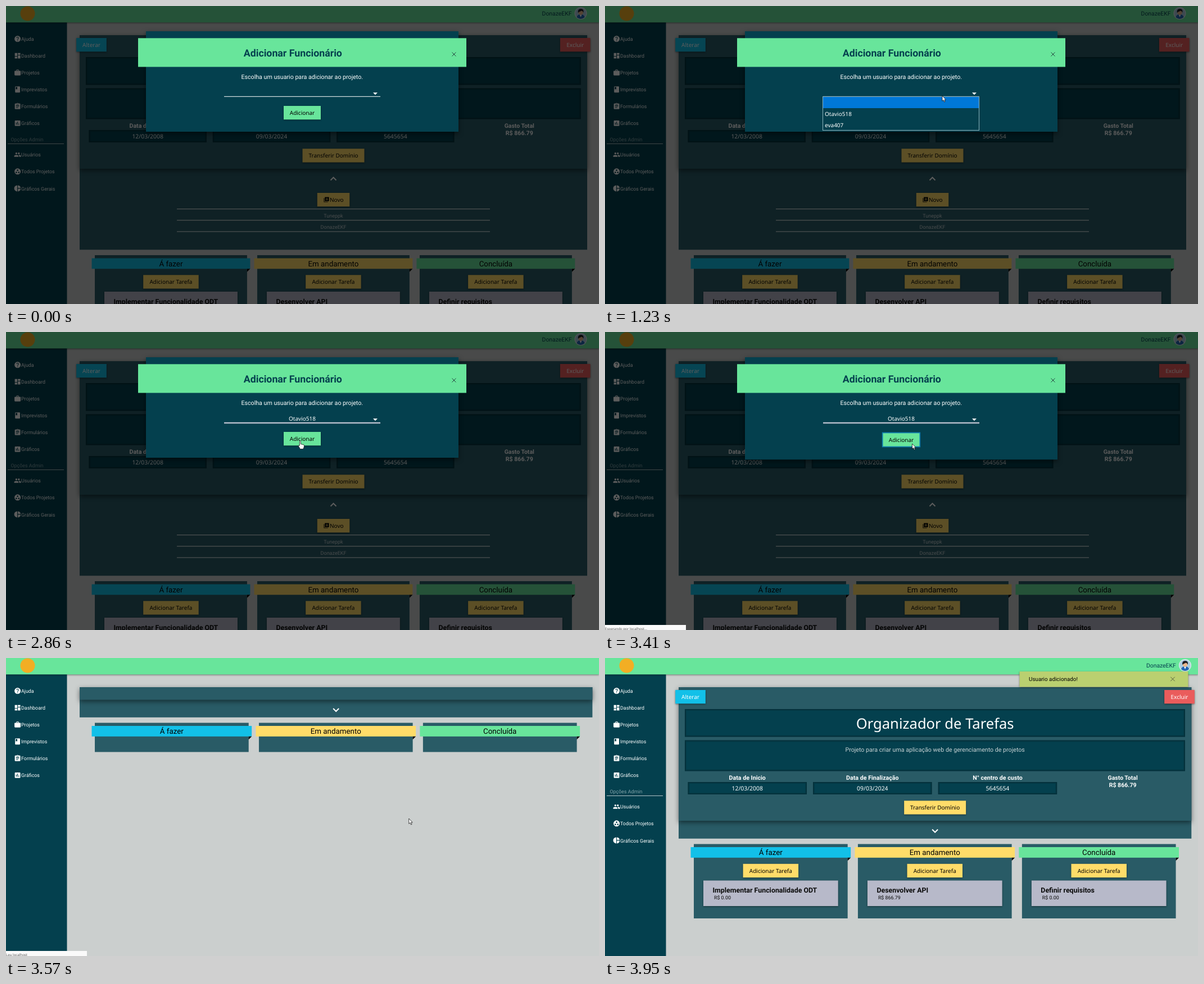
Write an HTML page that moves like this. It is 1055x531 px and loops after 4350 ms.

```html
<!DOCTYPE html>
<html lang="pt-BR">
<head>
<meta charset="utf-8">
<title>Adicionar funcionário</title>
<style>
html, body { margin: 0; width: 100%; height: 100%; overflow: hidden; background: #cbcfce; }
svg { display: block; width: 1055px; height: 531px; }
text { font-family: Roboto, sans-serif; text-rendering: geometricPrecision; white-space: pre; }
.n { font-family: "Noto Sans", sans-serif; }
.b { font-weight: 700; }
.m { text-anchor: middle; }
.e { text-anchor: end; }
.s { filter: drop-shadow(0 1px 1.5px rgba(0,0,0,.45)); }
.d { filter: drop-shadow(0 3px 4px rgba(0,0,0,.5)); }
</style>
</head>
<body>
<svg id="stage" viewBox="0 0 1055 531" xmlns="http://www.w3.org/2000/svg"></svg>
<script>
const LOOP = 4350, FIRST_STEP = 207, STEP = 77.8;
const GREEN = '#68e59b', DEEP = '#04404e', PANEL = '#295b66', YELLOW = '#ffdc69',
      BLUE = '#12c0e8', RED = '#ea5c5c', LILAC = '#b7b9c9', WHITE = '#fff', BLACK = '#000';
const USER = 'DonazeEKF', MEMBER = 'Tuneppk', PICKED = 'Otavio518', OTHER = 'eva407';

const rect = (x, y, w, h, fill, more = '') =>
  `<rect x="${x}" y="${y}" width="${w}" height="${h}" fill="${fill}" ${more}/>`;
// y is the middle of the capitals
const text = (x, y, size, str, cls = '', fill = WHITE) =>
  `<text x="${x}" y="${y + size * .36}" font-size="${size}" class="${cls}" fill="${fill}">${str}</text>`;
const line = (d, stroke, width) =>
  `<path d="${d}" fill="none" stroke="${stroke}" stroke-width="${width}"/>`;
const group = (id, body, more = '') => `<g id="${id}" ${more}>${body}</g>`;
const button = (cx, y, w, fill, label, ink = BLACK) =>
  rect(cx - w / 2, y, w, 24.3, fill, 'class="s"') + text(cx, y + 12.4, 10, label, 'n m', ink);
const cross = (x, y, r, color) =>
  line(`M${x - r} ${y - r}l${2 * r} ${2 * r}m0 ${-2 * r}l${-2 * r} ${2 * r}`, color, 1);
const field = (x, y, w, h) => rect(x, y, w, h, DEEP) +
  [1, 2, 3].map(i => rect(x + i / 2, y + i / 2, w - i, h - i, 'none',
    `stroke="#000" stroke-opacity=".1" stroke-width="${i}"`)).join('');

// Icons on a 24 unit grid, holes by the even-odd rule
const disc = (x, y, r) => `M${x - r} ${y}a${r} ${r} 0 1 0 ${2 * r} 0a${r} ${r} 0 1 0 ${-2 * r} 0z`;
const box = (x, y, w, h) => `M${x} ${y}h${w}v${h}h${-w}z`;
const icon = (x, y, scale, d, fill) =>
  `<path transform="translate(${x} ${y}) scale(${scale})" d="${d}" fill="${fill}" fill-rule="evenodd"/>`;
const ICONS = {
  help: disc(12, 12, 10) + box(11, 17, 2, 2) +
    'M8 9a4 4 0 0 1 8 0c0 2.6-3 3-3 6h-2c0-3.6 3-4 3-6a2 2 0 0 0-4 0z',
  tiles: box(3, 3, 8, 10) + box(3, 15, 8, 6) + box(13, 11, 8, 10) + box(13, 3, 8, 6),
  bag: 'M2 8q0-2 2-2h4V4q0-2 2-2h4q2 0 2 2v2h4q2 0 2 2v11q0 2-2 2H4q-2 0-2-2z' + box(10, 4, 4, 2),
  book: 'M4 4q0-2 2-2h12q2 0 2 2v16q0 2-2 2H6q-2 0-2-2zM6 4v8l2.5-1.5L11 12V4z',
  form: 'M3 5q0-2 2-2h4q3-4 6 0h4q2 0 2 2v14q0 2-2 2H5q-2 0-2-2z' +
    disc(12, 4, 1) + box(7, 7, 10, 2) + box(7, 11, 10, 2) + box(7, 15, 7, 2),
  bars: 'M3 5q0-2 2-2h14q2 0 2 2v14q0 2-2 2H5q-2 0-2-2z' +
    box(7, 10, 2, 7) + box(11, 7, 2, 10) + box(15, 13, 2, 4),
  people: disc(8, 8, 3) + disc(16, 8, 3) +
    'M1 19v-2.5c0-4.6 14-4.6 14 0V19zM17 19v-2.5q0-2-2-3.45c3-.3 8 .8 8 3.45V19z',
  team: disc(12, 12, 10) + disc(8, 15, 2.5) + disc(12, 8, 2.5) + disc(16, 15, 2.5),
  pie: 'M11 2v20a10 10 0 0 1 0-20zM13 2v9h9a10 10 0 0 0-9-9zM13 13v9a10 10 0 0 0 9-9z',
  add: 'M4 6H2v16h16v-2H4zM6 2h16v16H6z' + 'M13 5h2v4h4v2h-4v4h-2v-4h-4V9h4z'
};

const MENU = [['Ajuda', 'help'], ['Dashboard', 'tiles'], ['Projetos', 'bag'],
  ['Imprevistos', 'book'], ['Formulários', 'form'], ['Gráficos', 'bars']];
const ADMIN = [['Usuários', 'people'], ['Todos Projetos', 'team'], ['Gráficos Gerais', 'pie']];
const menu = (items, y0) => items.map(([label, name], i) => {
  const y = y0 + i * 30.05;
  return icon(14, y - 7, .55, ICONS[name], WHITE) + text(27, y, 8.9, label);
}).join('');

const COLUMNS = [
  ['Á fazer', BLUE, 'Implementar Funcionalidade ODT', 'R$ 0.00'],
  ['Em andamento', YELLOW, 'Desenvolver API', 'R$ 866.79'],
  ['Concluída', GREEN, 'Definir requisitos', 'R$ 0.00']
];
const DATES = [['Data de Inicio', '12/03/2008'], ['Data de Finalização', '09/03/2024'],
  ['N° centro de custo', '5645654']];

const column = ([name, color, task, cost], x, y, w, full) => {
  const cx = x + w / 2;
  let out = rect(x, y, w, full ? 132.5 : 52, PANEL) +
    rect(x - 5.5, y + 5.5, w + 11, 18.8, color) +
    `<path d="M${x + w} ${y + 24.3}h5.5l-5.5 5.5z"/>` +
    text(cx, y + 15, 13.35, name, 'm', BLACK);
  if (full) out += button(cx, y + 35.3, 98.5, YELLOW, 'Adicionar Tarefa') +
    rect(x + 17, y + 65, w - 34, 45.5, LILAC, 'class="s"') +
    text(x + 33.5, y + 82.3, 12.4, task, 'b', '#0a0a0a') +
    text(x + 36, y + 95.7, 8.85, cost, '', '#0a0a0a');
  return out;
};

const avatar = x => `<g transform="translate(${x} 13)"><circle r="11" fill="#dfe9ee"/>
  <circle r="9.8" fill="#a9cbe0"/><path d="M-7 7q1-5 7-5t7 5a9.8 9.8 0 0 1-14 0z" fill="#2166b5"/>
  <path d="M-2 2.5h4L0 7z" fill="#fff"/><circle cy="-1.5" r="4.3" fill="#eab78c"/>
  <path d="M-4.8-1q-1-7 5-7t4.6 7q-1-3-3-3.500-4 1-6.6 3.500z" fill="#1c1d24"/></g>`;

const details = (right, W, mid) =>
  button(152, 57, 53.7, BLUE, 'Alterar', WHITE) +
  button(right - 21.3, 57, 53.7, RED, 'Excluir', WHITE) +
  field(142, 91, right - 153.3, 49.5) + field(142, 146.5, right - 153.3, 55) +
  text(mid, 117, 25.6, 'Organizador de Tarefas', 'n m') +
  text(mid, 163, 10.67, 'Projeto para criar uma aplicação web de gerenciamento de projetos', 'm', '#c9d3d5') +
  DATES.map(([label, value], i) => {
    const x = 147.5 + i * W * .244, w = W * .2318;
    return text(x + w / 2, 213, 10.67, label, 'b m') + field(x, 221, w, 22) +
      text(x + w / 2, 232.3, 10.45, value, 'n m');
  }).join('') +
  text(147.5 + W * .848, 213, 10.5, 'Gasto Total', 'b m') +
  text(147.5 + W * .848, 226.5, 10.6, 'R$ 866.79', 'b m') +
  button(mid, 254.3, 110, YELLOW, 'Transferir Domínio');

const members = mid => button(mid, 333, 57.5, YELLOW, '') +
  icon(mid - 18, 339.5, .46, ICONS.add, BLACK) + text(mid - 6.5, 345.4, 10, 'Novo', 'n', BLACK) +
  [361.7, 381.8, 402].map(y => rect(mid - 278.5, y - .5, 557, 1, WHITE)).join('') +
  text(mid, 373.3, 9, MEMBER, 'm', '#c9d3d5') + text(mid, 393.5, 9, USER, 'm', '#c9d3d5');

function page(right, columnsTop, { full = true, open = false, face = '' } = {}) {
  const W = right - 131, mid = (131 + right) / 2, headEnd = full ? 290 : 74.5, flip = open ? -1 : 1;
  return rect(0, 0, 1055, 531, '#cbcfce') +
    rect(131, 52, W, columnsTop - 61.7, PANEL) +
    rect(131, 52, W, headEnd - 52, PANEL, 'class="d"') +
    (full ? details(right, W, mid) : '') +
    line(`M${mid - 5} ${headEnd + 18 - 2.5 * flip}l5 ${5 * flip}l5 ${-5 * flip}`, WHITE, 2) +
    (open ? members(mid) : '') +
    COLUMNS.map((c, i) => column(c, 158 + i * W * .32, columnsTop, W * .3, full)).join('') +
    rect(0, 29, 108.5, 502, DEEP) + menu(MENU, 59) +
    (full ? text(8.5, 237.5, 8.9, 'Opções Admin', '', '#84a1a8') +
      rect(3, 245, 100, 1, '#b5c3c6') + menu(ADMIN, 265.2) : '') +
    rect(0, 0, 1055, 29.3, GREEN, 'class="s"') +
    '<circle cx="38.5" cy="13.5" r="13" fill="#f2ae24"/>' +
    (full ? text(right - 27.5, 13.7, 10.4, USER, 'e', DEEP) + face : '');
}

const modal = rect(249, 45, 556, 179, DEEP, 'id="sheet" class="d"') +
  rect(235, 57.3, 584, 51.2, GREEN) +
  text(510.3, 84, 17.75, 'Adicionar Funcionário', 'b m', DEEP) + cross(797, 86, 3.5, '#24433f') +
  text(526.8, 125.7, 10.67, 'Escolha um usuario para adicionar ao projeto.', 'm') +
  '<path d="M653 154.2h8l-4 4z" fill="#fff"/>' +
  rect(388, 160.8, 278, 1, WHITE, 'id="underline"') +
  group('choice', text(527, 154.6, 10, PICKED, 'n m')) +
  group('idle', button(527, 178, 66, GREEN, 'Adicionar')) +
  group('focused', rect(493.7, 179.5, 66.6, 25, GREEN, 'stroke="#0f7fb0" stroke-width="1.7"') +
    text(527, 192.2, 10, 'Adicionar', 'n m', BLACK)) +
  group('list', rect(387.5, 161.5, 278, 60, DEEP, 'stroke="#8fb4bd"') +
    rect(388, 162, 277, 20, '#0078d7', 'id="mark"') +
    text(391, 192, 10, PICKED, 'n') + text(391, 212.2, 10, OTHER, 'n'));

const $ = id => document.getElementById(id);
$('stage').innerHTML =
  group('before', page(1034, 444, { open: true, face: avatar(1022.5) }) +
    rect(0, 0, 1055, 531, BLACK, 'opacity=".64"') + modal) +
  group('loading', page(1043.3, 115.5, { full: false })) +
  group('after', page(1043.3, 331.5, { face: group('face', avatar(1032)) })) +
  group('toast', rect(737.5, 24, 300, 27.5, '#bad070', 'class="s"') +
    text(754, 37.8, 9.85, 'Usuario adicionado!', '', BLACK) + cross(1010, 37.5, 3.7, '#566040')) +
  group('status', rect(0, 522, 144, 9, '#fafafa') +
    '<text id="message" x="0" y="530.5" font-size="6.15" class="n" fill="#555"></text>') +
  group('cursor', '<circle id="click" r="7" fill="#a2d840" opacity=".78"/>' +
    '<g stroke="#000" stroke-width=".7" fill="#fff" stroke-linejoin="round">' +
    '<path id="arrow" d="M0 0V9.3L2.2 7.5 3.7 11 5.3 10.3 3.8 7H6.5z"/>' +
    '<path id="hand" d="M-1 1.3q1-1.8 2 0V6l5 1q1 .3 1 1.5V11l-1.5 3.8H0L-3 9.5q0-1.7 1.2-1.2L-1 9z"/></g>');

// step, x, y of the pointer tip
const PATH = [[0, 994, 519], [1, 890, 415], [2, 790, 318], [3, 712, 248], [4, 655, 200],
  [5, 622, 174], [6, 608, 163], [7, 600.5, 160], [13, 600, 160], [15, 594, 165], [17, 545, 184],
  [19, 512, 191], [33, 512, 191], [36, 546, 199], [41, 546.5, 199], [42, 602.5, 221],
  [44, 831, 351], [47, 925, 515]];

function pointer(step) {
  const i = Math.max(1, PATH.findIndex(k => k[0] >= step));
  const [s0, x0, y0] = PATH[i - 1], [s1, x1, y1] = PATH[i];
  const p = (step - s0) / (s1 - s0);
  return [x0 + (x1 - x0) * p, y0 + (y1 - y0) * p];
}

const show = (id, on) => { $(id).style.display = on ? '' : 'none'; };
const set = (id, name, value) => $(id).setAttribute(name, value);

function draw(t) {
  const step = Math.floor((t - FIRST_STEP) / STEP);
  const within = (from, to) => step >= from && step < to;
  const moving = within(0, 48);
  const [x, y] = pointer(moving ? step : 0);
  const pressed = step >= 37;

  show('before', step < 42);
  show('loading', within(42, 44));
  show('after', step >= 44);
  show('face', step >= 45);

  show('list', within(10, 24));
  set('mark', 'y', y > 182 ? 182 : 162);
  show('choice', step >= 24);
  set('underline', 'height', step >= 10 ? 2.4 : 1);
  set('underline', 'fill', step >= 10 ? '#b9bfcd' : WHITE);
  show('idle', !pressed);
  show('focused', pressed);
  set('sheet', 'height', pressed ? 182.3 : 179);

  show('status', within(38, 44));
  $('message').textContent = step < 42 ? 'Esperando por localhost...' : 'Leu localhost';

  const q = Math.min(1, Math.max(0, (step - 43.8) / 4)), eased = 1 - (1 - q) ** 2;
  set('toast', 'opacity', eased);
  set('toast', 'transform', `translate(0 ${-34 * (1 - eased)})`);

  show('cursor', moving);
  set('cursor', 'transform', `translate(${x} ${y})`);
  const hand = within(28, 39);
  show('hand', hand);
  show('arrow', !hand);
  show('click', within(9, 12) || step === 23 || within(37, 39));
}

const start = performance.now();
(function tick() {
  draw((performance.now() - start) % LOOP);
  requestAnimationFrame(tick);
})();
</script>
</body>
</html>
```
